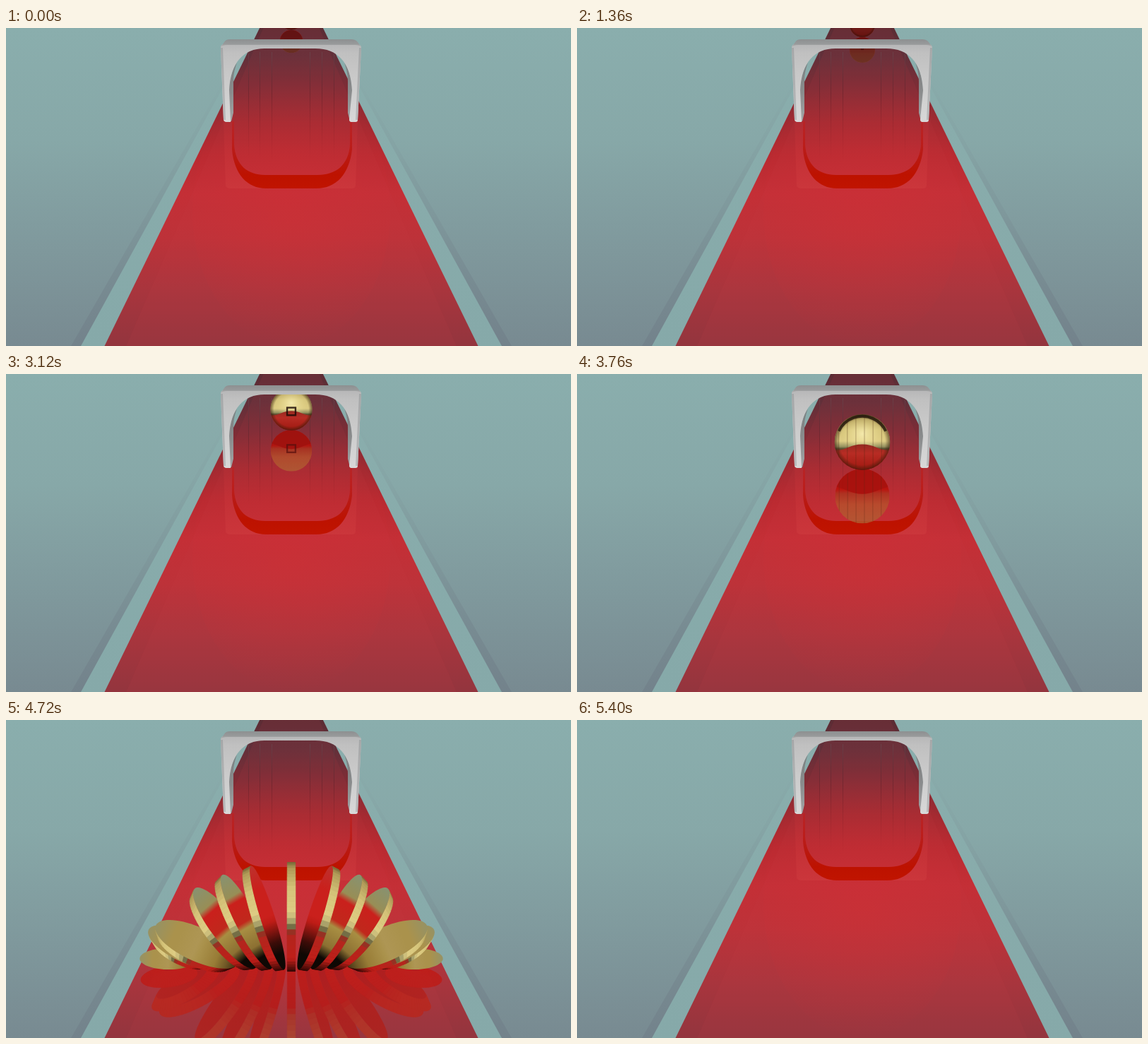
Write an HTML page with a canvas that moves like this. It is 800 px wide and 450 px high and loops after 5440 ms.

```html
<!DOCTYPE html>
<html lang="en">
<head>
<meta charset="utf-8">
<title>Sliced ball</title>
<style>
  html, body { margin: 0; width: 100%; height: 100%; overflow: hidden; background: #86a7a7; }
  canvas { display: block; width: 800px; height: 450px; }
</style>
</head>
<body>
<canvas id="stage" width="800" height="450"></canvas>
<script>
const stage = document.getElementById('stage');
const main = stage.getContext('2d');
const layer = document.createElement('canvas');
layer.width = 800;
layer.height = 450;
const glass = layer.getContext('2d');

const LOOP = 5440, STEP = 40;
const MID = 404, HORIZON = -92;
const FOCAL = 1111, COS = 0.9616, LEAN = 0.000246;
const R = 0.171, SIDE = 6, THICK = 2 * R / 13;
const SPEED = 2.231e-6, START = 0.010562, RAMP = 2000;
const GATE_Z = 1 / 224, SPLIT = 3740, OPEN = 3800;

const clamp = (v, lo = 0, hi = 1) => Math.min(hi, Math.max(lo, v));
const rgb = c => `rgb(${c.map(Math.round).join()})`;
const mix = (a, b, p) => a.map((v, i) => v + (b[i] - v) * p);

// Inverse scale on the floor: speeds up first, then runs evenly.
function travel(t) {
  const run = t < RAMP ? t * t / (2 * RAMP) : t - RAMP / 2;
  return START - SPEED * run;
}

function project(x, h, z) {
  const s = 1 / z, q = 1 - h * s * LEAN;
  return [MID + x * s / q, s * (1 - h / COS) / q + HORIZON];
}

function poly(g, points, fill) {
  g.beginPath();
  points.forEach(p => g.lineTo(p[0], p[1]));
  g.closePath();
  g.fillStyle = fill;
  g.fill();
}

function area(points) {
  return points.reduce((sum, p, i) => {
    const n = points[(i + 1) % points.length];
    return sum + p[0] * n[1] - n[0] * p[1];
  }, 0);
}

function blend(g, x0, y0, x1, y1, stops) {
  const grad = g.createLinearGradient(x0, y0, x1, y1);
  stops.forEach(([p, c]) => grad.addColorStop(p, typeof c === 'string' ? c : rgb(c)));
  return grad;
}

function pick(stops, u) {
  let i = 1;
  while (i < stops.length - 1 && stops[i][0] < u) i++;
  const [p, a] = stops[i - 1], [q, b] = stops[i];
  return mix(a, b, clamp((u - p) / (q - p)));
}

const RIM = [
  [0, [112, 98, 52]], [0.08, [176, 156, 88]], [0.28, [214, 197, 122]],
  [0.48, [222, 205, 132]], [0.58, [150, 146, 96]], [0.62, [84, 76, 46]],
  [0.66, [178, 38, 30]], [0.88, [190, 30, 24]], [1, [48, 8, 5]]
];
const RIM_MIRROR = [
  [0, [176, 96, 52]], [0.35, [182, 82, 44]], [0.55, [172, 52, 30]],
  [0.63, [186, 14, 6]], [1, [190, 16, 8]]
];
const UNDER = [200, 18, 8];

const FACE_AT = [0, 0.22, 0.29, 0.5, 0.56, 0.76, 0.88, 1];
const RED = [202, 32, 28], GOLD = [170, 146, 76], INK = [14, 8, 4];
const OLIVE = [136, 146, 112];
const FACES = [
  [[190, 48, 44], RED, RED, RED, [190, 28, 22], [60, 12, 8], INK, INK],
  [OLIVE, [152, 142, 86], RED, [192, 40, 28], [168, 142, 66], [140, 112, 50], INK, INK],
  [[150, 146, 100], GOLD, GOLD, [174, 150, 84], GOLD, [152, 124, 54], [112, 88, 38], [60, 44, 18]]
];

function faceStops(angle) {
  const a = clamp((angle - 20) / 6), b = clamp((angle - 52) / 8);
  return FACE_AT.map((p, i) =>
    [p, mix(mix(FACES[0][i], FACES[1][i], a), FACES[2][i], b)]);
}

function floor(g) {
  g.fillStyle = blend(g, 0, 0, 0, 450, [
    [0, '#8aaead'], [0.35, '#87a8a8'], [0.7, '#7f989c'], [1, '#788a91']
  ]);
  g.fillRect(0, 0, 800, 450);

  const lane = (half, fill) => {
    const top = half * (0 - HORIZON) / (450 - HORIZON);
    poly(g, [[MID - top, 0], [MID + top, 0], [MID + half, 450], [MID - half, 450]], fill);
  };
  lane(312, blend(g, 0, 60, 0, 450, [
    [0, 'rgba(116,132,140,0)'], [0.5, 'rgba(116,132,140,.2)'], [1, 'rgba(112,126,136,.65)']
  ]));
  lane(298, blend(g, 0, 0, 0, 450, [[0, '#8aaead'], [1, '#86a9a9']]));
  lane(264.5, blend(g, 0, 0, 0, 450, [
    [0, '#5c2c34'], [0.09, '#62303a'], [0.2, '#822c35'], [0.3, '#a22a31'],
    [0.4, '#b92a31'], [0.52, '#c42f36'], [0.66, '#bd3239'], [0.82, '#a9353d'], [1, '#93353e']
  ]));
  lane(234, 'rgba(196,66,70,.1)');

  const glow = g.createRadialGradient(MID, 260, 10, MID, 260, 190);
  glow.addColorStop(0, 'rgba(212,46,52,.35)');
  glow.addColorStop(1, 'rgba(212,46,52,0)');
  g.fillStyle = glow;
  g.beginPath();
  g.ellipse(MID, 260, 140, 190, 0, 0, 7);
  g.fill();

  g.lineWidth = 1;
  [343, 359, 376, 430, 447, 464].forEach(x => {
    g.strokeStyle = blend(g, 0, 30, 0, 190, [
      [0, 'rgba(110,82,88,.55)'], [0.4, 'rgba(60,20,28,.28)'], [1, 'rgba(110,15,20,0)']
    ]);
    g.beginPath();
    g.moveTo(x + 0.5, 34);
    g.lineTo(x + 0.5, 190);
    g.stroke();
  });
}

function gateMirror(g) {
  g.fillStyle = blend(g, 0, 132, 0, 228, [
    [0, 'rgba(214,54,58,.16)'], [1, 'rgba(214,70,70,.3)']
  ]);
  const hole = new Path2D(
    'M308 132H498L495 222Q495 227 490 227H318Q311 227 311 222Z' +
    'M323 132V165C325 194 342 208 367 208H441C467 208 485 194 487 165V132Z');
  g.fill(hole, 'evenodd');
  g.fillStyle = blend(g, 0, 132, 0, 227, [
    [0, 'rgba(190,25,22,.45)'], [0.5, '#b91a14'], [0.8, '#bd1200'], [1, '#c01400']
  ]);
  g.fill(new Path2D(
    'M320 132V172C323 207 342 227 368 227H440C467 227 486 207 490 172V132H487V165' +
    'C485 194 467 208 441 208H367C342 208 325 194 323 165V132Z'));
}

function gate(g) {
  // inner walls of both legs
  g.fillStyle = blend(g, 0, 50, 0, 132, [[0, '#7c7f80'], [0.5, '#8a8c8d'], [1, '#a2a4a5']]);
  g.fill(new Path2D(
    'M316 132V84C317 70 321 58 327 49C323 60 322 68 322 76V120L319 132Z' +
    'M490 132V84C489 70 485 58 479 49C483 60 484 68 484 76V120L487 132Z'));
  g.fillStyle = blend(g, 0, 22, 0, 133, [[0, '#b6b6b7'], [0.12, '#c0c0c0'], [0.5, '#cbcbcb'], [1, '#d8d8d8']]);
  g.fill(new Path2D(
    'M304 28Q304 23 310 22H496Q503 23 503 28L498 130Q498 133 495 133H488' +
    'Q486 132 486 130L490 88C488 49 470 29 438 29H366C336 29 318 49 316 88' +
    'L318 133H311Q308 132 308 130Z'));
  g.fillStyle = blend(g, 0, 16, 0, 27, [[0, '#8d9091'], [0.6, '#989a9b'], [1, '#b4b5b5']]);
  g.fill(new Path2D('M304 27L309 20Q311 16 317 16H489Q495 16 498 20L503 27Q500 24 494 24H313Q307 24 304 27Z'));
  g.lineWidth = 3;
  g.strokeStyle = blend(g, 0, 25, 0, 132, [[0, '#a4a6a7'], [1, '#b8babb']]);
  g.stroke(new Path2D('M305.5 28L309.5 130M501.5 28L496.5 130'));
}

function ball(g, z, m) {
  const [x, y] = project(0, R * m, z);
  const r = R / z / (1 - R * m / z * LEAN) * 1.005;
  const gap = z - GATE_Z;
  g.save();
  g.translate(x, y);
  g.scale(r, r * m);
  g.beginPath();
  g.arc(0, 0, 1, 0, 7);
  g.clip();

  const tones = m > 0 ? RIM : RIM_MIRROR;
  g.fillStyle = blend(g, 0, -1, 0, 1, tones);
  g.fillRect(-1, -1, 2, 2);
  if (m > 0) {
    const shine = g.createRadialGradient(0, -0.3, 0, 0, -0.3, 0.75);
    shine.addColorStop(0, 'rgba(255,246,190,.7)');
    shine.addColorStop(1, 'rgba(240,225,150,0)');
    g.fillStyle = shine;
    g.fillRect(-1, -1, 2, 1.2);
  }
  g.fillStyle = m > 0
    ? blend(g, 0, 0, 0, 1, [[0, '#8c2a20'], [0.4, '#b82c24'], [1, '#a01810']])
    : '#a60c05';
  g.fill(new Path2D('M-1 .34C-.6 .28 -.4 .08 0 .08S.6 .28 1 .34V1H-1Z'));

  const edge = g.createRadialGradient(0, 0, 0.82, 0, 0, 1);
  edge.addColorStop(0, 'rgba(50,30,10,0)');
  edge.addColorStop(1, 'rgba(50,25,8,.6)');
  g.fillStyle = m > 0 ? edge : 'rgba(0,0,0,0)';
  g.fillRect(-1, -1, 2, 2);

  // the gate mirrored in the ball, growing as it nears
  const half = gap > 0.00006 ? 0.2 * Math.pow(0.00137 / gap, 0.8) : 2;
  if (half < 1.1) {
    g.strokeStyle = m > 0 ? 'rgba(30,12,8,.85)' : 'rgba(70,8,4,.7)';
    g.lineWidth = 0.08;
    g.strokeRect(-half, 0.1 - half * 0.9, half * 2, half * 1.8);
  } else if (m > 0) {
    g.strokeStyle = 'rgba(25,14,6,.75)';
    g.lineWidth = 0.1;
    g.beginPath();
    g.arc(0, 0, 0.93, -2.7, -0.44);
    g.stroke();
  }
  if (gap < 0.0005) {
    g.strokeStyle = 'rgba(70,40,15,.35)';
    g.lineWidth = 0.025;
    for (let k = -5.5; k < 6; k += 2) {
      g.beginPath();
      g.moveTo(k / 6.5, -1);
      g.lineTo(k / 6.5, 1);
      g.stroke();
    }
  }
  // darker while far away
  g.fillStyle = `rgba(56,14,14,${0.6 * clamp((z - 0.0058) / 0.004)})`;
  g.fillRect(-1, -1, 2, 2);
  g.restore();
}

const FALL = [0, 7.5, 11.5, 15.5, 26, 43, 100];
const REST = [0, 70, 70, 69, 68, 63, 86];

function slice(g, k, time, z, m) {
  const n = Math.abs(k), side = k < 0 ? -1 : 1;
  const angle = Math.min(REST[n], FALL[n] * Math.pow(time / 660, 2.3));
  const a = angle * Math.PI / 180, sin = Math.sin(a), cos = Math.cos(a);
  const spread = 0.17 * Math.pow(n / 6, 2) * Math.pow(time / 980, 3);
  const radius = off => R * Math.sqrt(Math.max(0, 1 - Math.pow((n * THICK + off) / R, 2)));
  const body = radius(0);
  const drop = Math.min(1, Math.pow(time / 400, 2));
  const base = (R - body) * (1 - drop) + THICK / 2 * sin;
  const thin = THICK * (0.5 - 0.03 * drop);

  const point = (off, phi) => {
    const r = radius(off);
    const v = body + r * Math.cos(phi);
    const x = side * (n * THICK + spread + v * sin + off * cos);
    const h = base + v * cos - off * sin;
    return project(x, h * m, z - r * Math.sin(phi) * COS / FOCAL);
  };
  const COUNT = 64, inner = [], outer = [];
  for (let i = 0; i < COUNT; i++) {
    const phi = i / COUNT * 2 * Math.PI;
    inner.push(point(-thin, phi));
    outer.push(point(thin, phi));
  }
  const facing = pts => area(pts) * side * m;

  g.lineWidth = 0.7;
  for (let i = 0; i < COUNT; i++) {
    const j = (i + 1) % COUNT;
    const quad = [inner[i], inner[j], outer[j], outer[i]];
    if (facing(quad) >= 0) continue;
    const phi = (i + 0.5) / COUNT * 2 * Math.PI;
    const u = (1 - Math.cos(phi + m * 0.35)) / 2;
    const tone = rgb(m > 0
      ? pick(RIM, u)
      : mix(pick(RIM_MIRROR, u), UNDER, clamp(angle / 80)));
    poly(g, quad, tone);
    g.strokeStyle = tone;
    g.stroke();
  }
  const tip = inner[0], foot = inner[COUNT / 2];
  if (facing(inner) > 0) {
    poly(g, inner, m > 0
      ? blend(g, ...tip, ...foot, faceStops(angle))
      : '#b8200f');
  }
  if (facing(outer) < 0) {
    poly(g, outer, m > 0
      ? blend(g, ...tip, ...foot, [[0, [150, 140, 80]], [1, [120, 24, 16]]])
      : blend(g, ...tip, ...foot, [[0, '#b81a10'], [0.6, '#b4140c'], [1, '#a81010']]));
  }
}

function slices(g, time, z, m) {
  const order = [];
  for (let n = SIDE; n > 0; n--) order.push(-n, n);
  order.push(0);
  if (m < 0) order.reverse();
  order.forEach(k => slice(g, k, time, z, m));
}

function thing(t, z) {
  const draw = t < OPEN
    ? (g, m) => ball(g, z, m)
    : (g, m) => slices(g, t - SPLIT, z, m);
  glass.clearRect(0, 0, 800, 450);
  draw(glass, -1);
  // the floor mirrors less under a steeper view
  main.globalAlpha = 0.8 * clamp(z / 0.003);
  main.drawImage(layer, 0, 0);
  main.globalAlpha = 1;
  draw(main, 1);
}

function render(t) {
  const z = travel(t);
  floor(main);
  if (t < SPLIT) thing(t, z);
  gateMirror(main);
  gate(main);
  if (t >= SPLIT) thing(t, z);
}

function tick() {
  const t = performance.now() % LOOP;
  render(Math.floor(t / STEP) * STEP);
  requestAnimationFrame(tick);
}
tick();
</script>
</body>
</html>
```
